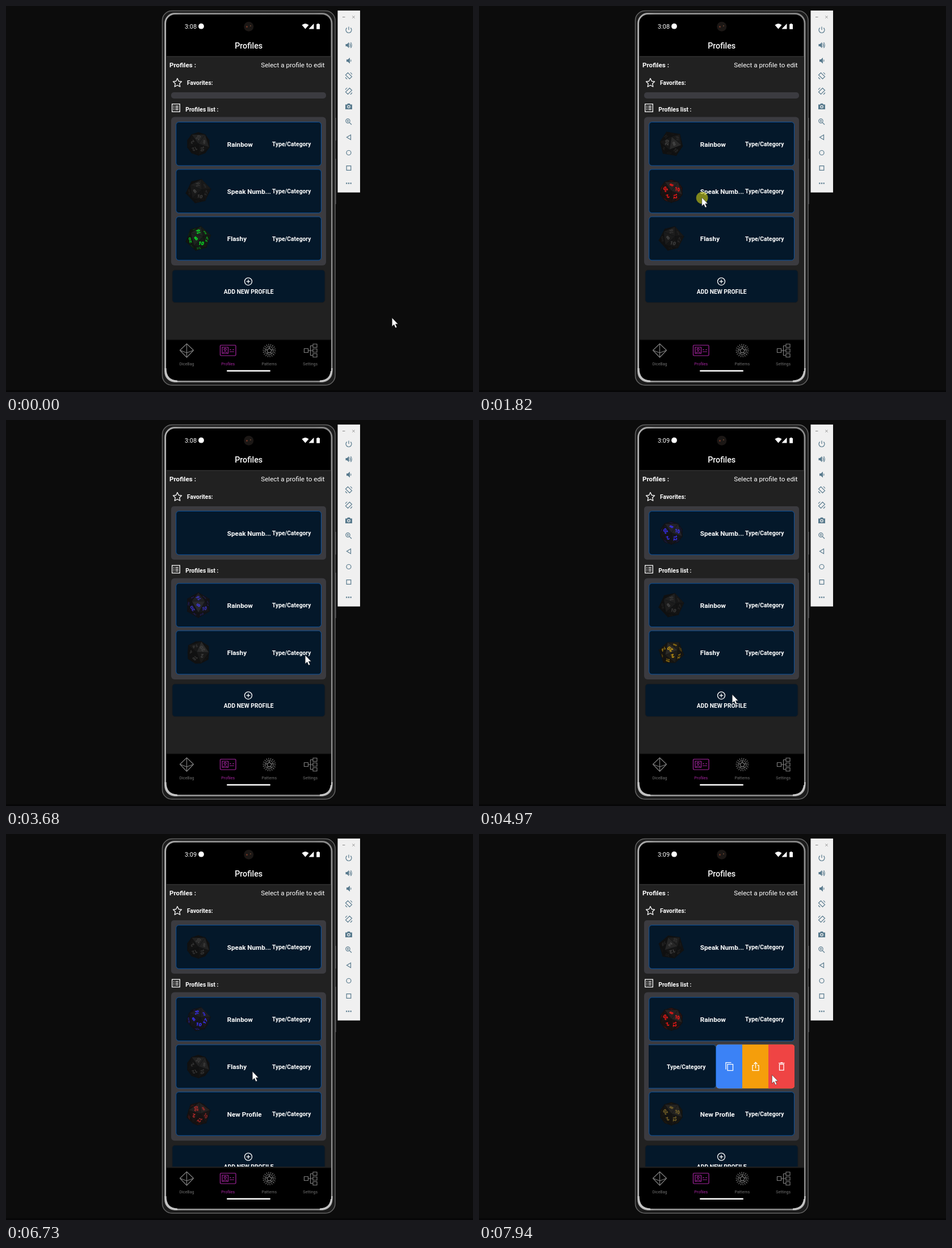
An HTML page that plays this animation: 823x680 px, repeating every 8 s.

```html
<!DOCTYPE html>
<html lang="en">
<head>
<meta charset="utf-8">
<title>Profiles</title>
<style>
html, body { margin: 0; width: 100%; height: 100%; overflow: hidden; background: #0c0c0c; }
svg { display: block; font-family: Roboto, sans-serif; fill: #fff; }
.line { fill: none; stroke: #fff; stroke-width: 1.3; }
.b { font-weight: 700; }
.big { font-size: 11.7px; }
.mid { font-size: 10.3px; }
.nav { font-size: 7.1px; text-anchor: middle; fill: #6e6e6e; }
.navline { fill: none; stroke: #7c7c7c; stroke-width: 1.2; stroke-linejoin: round; }
.box { fill: #3b3b40; }
.card { fill: #04182a; stroke: #0c539f; stroke-width: 1; }
.tool { fill: none; stroke: #587a8d; stroke-width: 1.2; }
.solid { fill: #587a8d; stroke: none; }
.die text { font-size: 9px; font-weight: 700; text-anchor: middle; stroke-width: .3; }
</style>
</head>
<body>
<svg id="stage" width="823" height="680" viewBox="0 0 823 680">
  <defs>
    <clipPath id="body"><rect x="283" y="90" width="290" height="496"/></clipPath>
    <clipPath id="row"><rect x="299" y="-1" width="257" height="79"/></clipPath>
    <linearGradient id="metal">
      <stop stop-color="#b4b4b4"/><stop offset=".1" stop-color="#8c8c8c"/>
      <stop offset=".9" stop-color="#7c7c7c"/><stop offset="1" stop-color="#8e8e8e"/>
    </linearGradient>
  </defs>
  <rect width="823" height="680" fill="#0c0c0c"/>
  <rect y="677" width="823" height="3" fill="#060607"/>

  <!-- phone -->
  <path d="M579 197h3v40h-3zM579 269h3v80h-3z" fill="#3d3d3f"/>
  <rect x="275.500" y="8.500" width="304.500" height="659.500" rx="17" fill="#1c1c1c" stroke="#626262" stroke-width="1.500"/>
  <rect x="280.700" y="13.500" width="293.300" height="648" rx="17" fill="#000" stroke="url(#metal)" stroke-width="2.800"/>
  <path d="M281 638q0 23 21 23M574 638q0 23-21 23" fill="none" stroke="#c4c4c4" stroke-width="3.200"/>
  <rect x="283" y="88.500" width="290" height="500" fill="#212121"/>
  <path d="M283 89h290" stroke="#3a3a3a"/>

  <!-- status bar -->
  <text id="clock" x="315" y="39.700" font-size="10.900"></text>
  <circle cx="344" cy="35.700" r="4.900"/>
  <circle cx="427.800" cy="36.300" r="8.500" fill="#1b1715"/>
  <circle cx="424.500" cy="36.500" r="1.500" fill="#6d3526"/><circle cx="431" cy="35" r="1" fill="#6d4a35"/>
  <path d="M521.500 33.500q6-5 12 0l-6 7zM542.500 31v9.500h-9zM548.600 32v-1h3v1h1.400v8.800h-5.800v-8.800z"/>
  <text x="427.700" y="74.700" font-size="14.300" font-weight="500" text-anchor="middle">Profiles</text>

  <g clip-path="url(#body)">
    <text class="b big" x="288" y="108">Profiles :</text>
    <text class="big" x="561.700" y="108" text-anchor="end">Select a profile to edit</text>
    <path class="line" stroke-linejoin="round" d="M302 127.500l2.400 5 5.200.6-3.900 3.700 1.100 5.400-4.800-2.700-4.800 2.700 1.100-5.400-3.900-3.700 5.200-.6z"/>
    <text class="b mid" x="319" y="139">Favorites:</text>
    <rect id="favBox" class="box" x="291" y="152" width="273" rx="5"/>
    <g id="listHead">
      <path class="line" d="M292.700 172.700h13.600v13.600h-13.600zM298.500 176.500h5.300M298.500 179.500h5.300M298.500 182.500h5.300M295 176.500h1.600M295 179.500h1.600M295 182.500h1.600"/>
      <text class="b mid" x="316.300" y="186">Profiles list :</text>
    </g>
    <rect id="listBox" class="box" x="291" width="273" rx="6"/>
    <g id="cards"></g>
    <g id="add">
      <rect x="293" y="465" width="269" height="57.500" rx="5" fill="#04182a" stroke="#191b1e"/>
      <circle class="line" cx="427" cy="485.300" r="6.500"/>
      <path class="line" d="M423.700 485.300h6.600M427 482v6.600"/>
      <text class="b mid" x="427.700" y="506.500" text-anchor="middle">ADD NEW PROFILE</text>
    </g>
  </g>

  <!-- tabs -->
  <rect x="283" y="588" width="290" height="55" fill="#000"/>
  <path d="M283 588h290" stroke="#151515"/>
  <path class="navline" d="M318.500 595l12 11.500-12 12.500-12-12.500zM306.500 606.500l12 4.500 12-4.500M318.500 595v16v8"/>
  <g class="navline" style="stroke:#a3249e">
    <rect x="377.500" y="597.500" width="27.500" height="18.500" rx="1.500"/>
    <rect x="381" y="601" width="10.500" height="11"/>
    <circle cx="386.200" cy="605" r="1.900"/><path d="M382.500 611.500q3.700-5 7.400 0M394 605.500h3M399 605.500h3M394 609h8"/>
  </g>
  <g class="navline">
    <circle cx="464" cy="607" r="10" stroke-width="3.400" stroke-dasharray="1 2.490"/>
    <circle cx="464" cy="607" r="7" stroke-width="1"/>
    <path d="M464 603l4 3-1.500 4.600h-5l-1.500-4.600zM464 603v-3M468 606l2.800-1M466.500 610.600l1.800 2.400M461.500 610.600l-1.800 2.400M460 606l-2.800-1"/>
    <path d="M525.500 603.500h7v7h-7zM541 595.500h7v6h-7zM541 604h7v6h-7zM541 612.500h7v6h-7zM532.500 607h8.500M541 598.500h-4.500v17h4.500"/>
  </g>
  <text class="nav" x="318.500" y="632.500">DiceBag</text>
  <text class="nav" x="391.300" y="632.500" style="fill:#a3249e">Profiles</text>
  <text class="nav" x="463.800" y="632.500">Patterns</text>
  <text class="nav" x="536.300" y="632.500">Settings</text>
  <rect x="389" y="641.500" width="77" height="2.600" rx="1.300"/>

  <!-- emulator toolbar -->
  <rect x="584.500" y="8" width="39.500" height="320.500" fill="#f0f0f0"/>
  <g class="tool">
    <path d="M593 19.500h4.500M610.500 17.500l4 4M614.500 17.500l-4 4" stroke="#888" stroke-width="1"/>
    <path d="M604 36.500v5.500M600.700 38.500a5 5 0 1 0 6.600 0"/>
    <path class="solid" d="M598.500 67v4h2.500l3.500 3.300v-10.600l-3.500 3.300zM600 94.300v4h2.500l3.500 3.300v-10.600l-3.500 3.300z"/>
    <path d="M606 66q2 3 0 6M607.500 64q3.500 5 0 10M607.500 94.500q1 1.800 0 3.600"/>
    <path d="M598.500 121.500l4-4 7 7-4 4zM598.300 125.500q.7 2.500 3 3.300M609.700 120.500q-.7-2.500-3-3.300"/>
    <path d="M609.500 148.500l-4-4-7 7 4 4zM609.700 152.500q-.7 2.500-3 3.300M598.300 147.500q.7-2.500 3-3.300"/>
    <path class="solid" d="M598 173.500h3l1.200-1.700h3.600l1.200 1.700h3v8.500h-12z"/>
    <circle cx="604" cy="177.500" r="2.200" style="stroke:#f0f0f0"/>
    <circle cx="602.500" cy="202.500" r="3.600"/><path d="M605.300 205.300l3.700 3.700M600.800 202.500h3.400M602.500 200.800v3.400"/>
    <path d="M607.500 227v8.500l-7-4.250z"/><circle cx="604" cy="258.500" r="4"/><path d="M600.200 281.700h7.600v7.600h-7.600z"/>
    <path class="solid" d="M599.200 311.300h2.200v2.200h-2.200zM602.900 311.300h2.200v2.200h-2.200zM606.600 311.300h2.200v2.200h-2.200z"/>
  </g>

  <circle id="press" r="10.500" fill="#c8c814" fill-opacity=".63"/>
  <path id="cursor" d="M.3.300v15.200l3.500-3.200 2.500 5.700 2.500-1.100-2.500-5.600h4.500z" stroke="#111" stroke-width=".5"/>
</svg>
<script>
const LOOP = 8000, FAV_AT = 3680, NEW_AT = 5570, PITCH = 83.35, GREY = [76, 76, 76];
const $ = id => document.getElementById(id);
const set = (el, attrs) => { for (const k in attrs) el.setAttribute(k, attrs[k]); };
const shift = (el, x, y) => el.setAttribute('transform', `translate(${x} ${y})`);
const show = (el, on) => { el.style.display = on ? '' : 'none'; };
const mix = (a, b, k) => a + (b - a) * k;
const clamp = v => Math.max(0, Math.min(1, v));
const ease = (t, from, to) => { const k = clamp((t - from) / (to - from)); return k * k * (3 - 2 * k); };

// keys: rows of [time, ...values]
function track(keys, t) {
  let i = 0;
  while (i < keys.length - 2 && t > keys[i + 1][0]) i++;
  const a = keys[i], b = keys[i + 1], k = clamp((t - a[0]) / (b[0] - a[0]));
  return a.slice(1).map((v, n) => mix(v, b[n + 1], k));
}

// --- twenty-sided die, one corner towards the viewer ---
const ring = (z, start) => [...Array(5)].map((_, i) => {
  const a = (start + 72 * i) * Math.PI / 180, r = 2 / Math.sqrt(5);
  return [r * Math.cos(a), r * Math.sin(a), z];
});
const near = [0, 0, 1], far = [0, 0, -1];
const upper = ring(1 / Math.sqrt(5), -126), lower = ring(-1 / Math.sqrt(5), -90);
const crown = [8, 10, 12, 2, 20], belt = [16, 17, 15, 18, 14];
const faces = [];
for (let i = 0; i < 5; i++) {
  const j = (i + 1) % 5, o = (i + 3) % 5;
  faces.push({ n: crown[i], v: [near, upper[i], upper[j]] },
    { n: belt[i], v: [lower[i], upper[i], upper[j]] },
    { n: 21 - belt[o], v: [upper[j], lower[i], lower[j]] },
    { n: 21 - crown[o], v: [far, lower[i], lower[j]] });
}

// pitch first, then roll, then yaw
function rotator(pose) {
  const [y, p, r] = pose.map(d => d * Math.PI / 180);
  const turn = (a, b, w) => [a * Math.cos(w) - b * Math.sin(w), a * Math.sin(w) + b * Math.cos(w)];
  return ([a, b, c]) => {
    [b, c] = turn(b, c, p);
    [a, b] = turn(a, b, r);
    [c, a] = turn(c, a, y);
    return [a, b, c];
  };
}

function dieMarkup(pose, color, glow) {
  const R = 22.8, spin = rotator(pose);
  const f = v => v.toFixed(2);
  let out = '';
  for (const face of faces) {
    const v = face.v.map(spin);
    const c = [0, 1, 2].map(k => (v[0][k] + v[1][k] + v[2][k]) / 3);
    if (c[2] <= 0.01) continue;
    const n = c.map(q => q / 0.7947);
    const light = Math.max(0, n[0] * 0.2 - n[1] * 0.25 + n[2] * 0.94);
    const base = 16 + 32 * light ** 6;
    const fill = color.map(q => Math.round(base + glow * q * 0.03));
    out += `<polygon points="${v.map(p => f(p[0] * R) + ',' + f(p[1] * R)).join(' ')}" fill="rgb(${fill})" stroke="#121212" stroke-width=".4"/>`;
    const d = v[1].map((q, k) => c[k] - q), len = Math.hypot(...d);
    const down = d.map(q => q / len);
    const right = [down[1] * n[2] - down[2] * n[1], down[2] * n[0] - down[0] * n[2]];
    const ink = `rgb(${color.map((q, k) => Math.round(mix(GREY[k], q, glow)))})`;
    const seen = clamp(mix(n[2] ** 2, n[2] * 1.4, glow));
    out += `<text y="3.2" transform="matrix(${[right[0], right[1], down[0], down[1], c[0] * R, c[1] * R].map(f)})" fill="${ink}" stroke="${ink}" opacity="${f(seen)}">${face.n}</text>`;
  }
  return out;
}

// --- profiles: poses at shared times, light pulses as [time, strength, colour] ---
const poseTimes = [0, 1820, 2710, 3680, 4970, 6730, 7940];
const red = [255, 25, 25], blue = [60, 50, 255], green = [10, 240, 40], amber = [225, 170, 10];
const profiles = [
  { name: 'Rainbow',
    poses: [[0, 0, 72], [15, -37, 40], [0, -37, 0], [0, -37, 0], [-17, -37, 20], [-28, -37, 20], [0, 0, 0]],
    pulses: [[900, .9, green], [3680, .75, blue], [5750, .9, amber], [6730, 1, blue], [7940, 1, red]] },
  { name: 'Speak Numb...',
    poses: [[-21, -37, 20], [0, 0, 0], [40, 10, 30], [0, -37, 0], [0, 0, 0], [0, 0, 72], [20, 10, 72]],
    pulses: [[1820, 1, red], [4970, 1, blue]] },
  { name: 'Flashy',
    poses: [[-14, -37, 15], [-21, -33, 20], [15, -20, 60], [55, 0, 20], [30, 10, 0], [0, 0, 72], [0, 0, 0]],
    pulses: [[0, 1, green], [1150, .9, red], [4970, .85, amber], [6000, .8, green]] },
  { name: 'New Profile',
    poses: [[0, 0, 0], [0, 0, 0], [0, 0, 0], [0, 0, 0], [0, 0, 0], [10, 0, 36], [0, 0, 0]],
    pulses: [[6730, .6, red], [7940, .45, amber]] }
];

const leftAction = `<rect x="299.500" y="-.5" width="60" height="77.500" rx="5" fill="#a855f7"/>
  <path class="line" d="M324.500 31.500h9.500v14l-4.750-2.500-4.750 2.500zM329.250 34.500v5.500M326.500 37.250h5.500" stroke-width="1.500"/>`;
const rightActions = `<rect x="418" y="-.5" width="138" height="77.500" rx="5" fill="#f59e0b"/>
  <path d="M464 -.5h-41a5 5 0 0 0-5 5v67.500a5 5 0 0 0 5 5h41z" fill="#3b82f6"/>
  <path d="M510 -.5h41a5 5 0 0 1 5 5v67.500a5 5 0 0 1-5 5h-41z" fill="#ef4444"/>
  <g class="line"><path d="M438 34.500h9.500v11h-9.500zM435 43.500v-12h9.500"/>
  <path d="M484.500 36.500h-2.500v9h11v-9h-2.500M487.500 41.500v-10M484.500 34l3-3 3 3"/>
  <path d="M529.500 34.500h7.500v10.500h-7.500zM528 32.500h10.500M531.500 31.500h3.500"/></g>`;

for (const p of profiles) {
  const g = document.createElementNS('http://www.w3.org/2000/svg', 'g');
  g.innerHTML = `<g clip-path="url(#row)"><g class="actions">${p.name === 'Flashy' ? rightActions : leftAction}</g>
    <g class="slide"><rect class="card" x="299.700" width="255.800" height="76.700" rx="5"/>
    <g class="die" transform="translate(339 38.300)"></g>
    <text class="b big" x="389.800" y="43">${p.name}</text>
    <text class="b mid" x="469" y="42.500">Type/Category</text></g></g>`;
  $('cards').append(g);
  p.el = g;
  for (const part of ['actions', 'slide', 'die']) p[part] = g.querySelector('.' + part);
  p.keys = p.poses.map(([y, ...rest], i) => [poseTimes[i], y + 360 * i, ...rest]);
}
const [rainbow, speak, flashy, fresh] = profiles;

function drawDie(p, t) {
  let glow = 0, color = GREY;
  for (const [at, power, tint] of p.pulses) {
    const g = power * clamp(1.4 - Math.abs(t - at) / 250);
    if (g > glow) { glow = g; color = tint; }
  }
  p.die.innerHTML = dieMarkup(track(p.keys, t), color, glow);
}

function place(p, y, dx) {
  shift(p.el, 0, y);
  shift(p.slide, dx, 0);
  show(p.actions, dx !== 0);
}

const path = [
  [0, 680, 549], [70, 680, 549], [900, 490, 482], [1650, 396, 340], [1800, 392, 337], [1900, 394, 337],
  [2250, 468, 340], [2400, 440, 343], [2710, 345, 343], [2830, 336, 337], [2960, 336, 337], [3260, 527, 414],
  [3680, 527, 414], [4100, 525, 422], [4515, 494, 424], [4970, 446, 483], [5150, 438, 500], [5310, 437, 502],
  [5650, 437, 502], [6380, 440, 527], [6730, 434, 418], [6850, 432, 417], [7240, 318, 420],
  [7330, 318, 420], [7700, 538, 426], [7940, 516, 424]
];
const presses = [[1750, 2260], [2840, 2970], [5140, 5260], [6800, 7260]];

function render(t) {
  const live = t >= 3260 && t < FAV_AT ? 3260 : t >= 5310 && t < NEW_AT ? 5310 : t;
  const fav = t >= FAV_AT, added = t >= NEW_AT;
  const top = fav ? PITCH : 0, extra = added ? PITCH : 0;

  $('clock').textContent = t < 4250 ? '3:08' : '3:09';
  set($('favBox'), { height: fav ? 94 : 11 });
  shift($('listHead'), 0, top);
  set($('listBox'), { y: 195.4 + top, height: 261.6 - top + extra });
  shift($('add'), 0, extra);

  place(rainbow, 204.5 + top, 0);
  place(speak, fav ? 160.6 : 204.5 + PITCH, fav ? 0 : 60 * ease(live, 1900, 2300));
  place(flashy, 204.5 + 2 * PITCH, -138 * ease(live, 6860, 7290));
  place(fresh, 204.5 + 3 * PITCH, 0);
  show(fresh.el, added);
  show(speak.die, !fav || t >= 3950);
  show(fresh.die, t >= 5850);
  for (const p of profiles) drawDie(p, live);

  const [x, y] = track(path, live);
  shift($('cursor'), x, y);
  set($('press'), { cx: x + 0.7, cy: y + 1 });
  show($('press'), presses.some(([a, b]) => live >= a && live < b));
}

const start = performance.now();
function frame() {
  render((performance.now() - start) % LOOP);
  requestAnimationFrame(frame);
}
frame();
</script>
</body>
</html>
```
